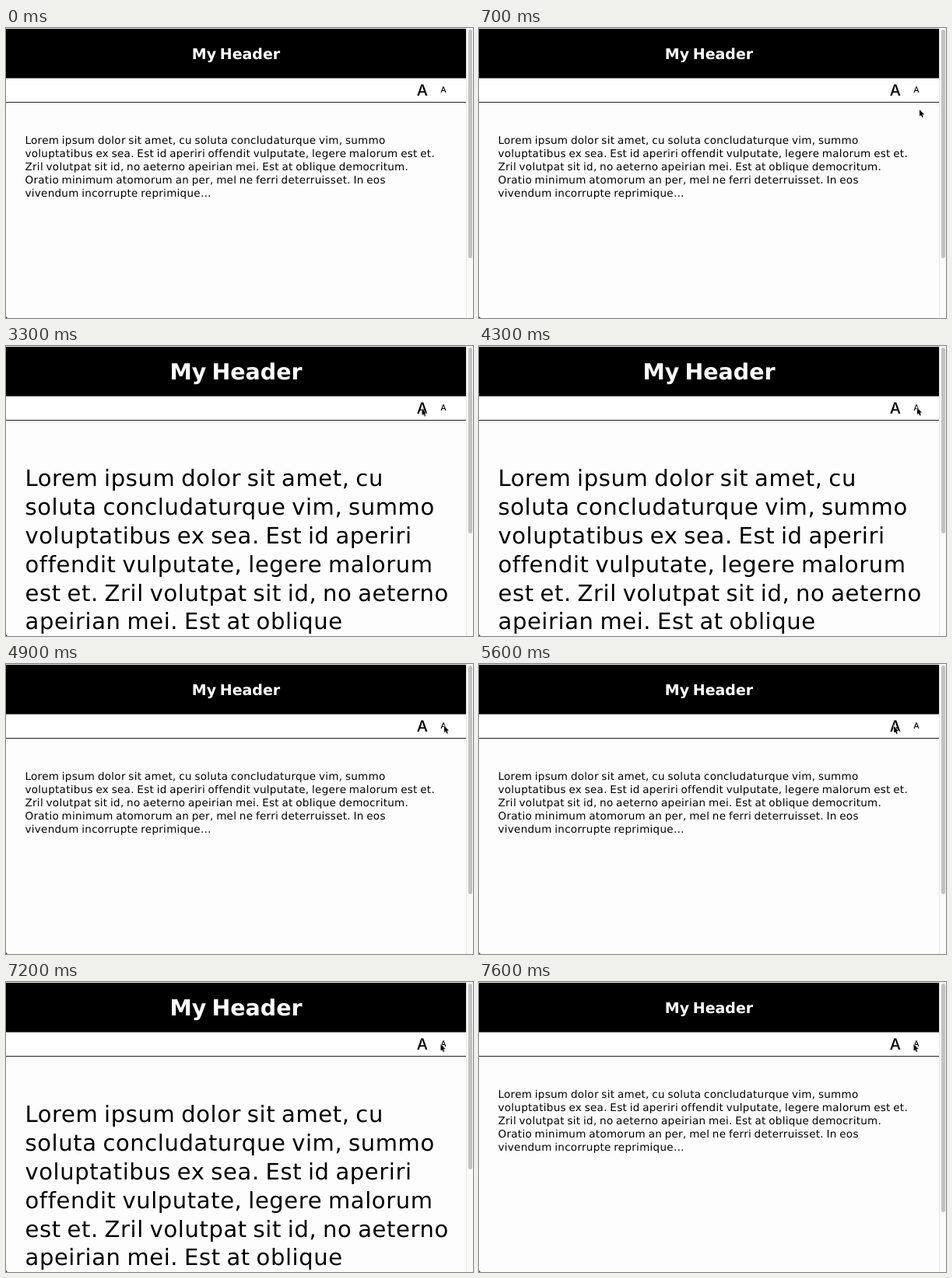
These frames come from a looping animation (600x373 px, 8 s). An HTML page:

```html
<!DOCTYPE html>
<html lang="en">
<head>
<meta charset="utf-8">
<title>Text size controls</title>
<style>
  html, body { margin: 0; width: 100%; height: 100%; overflow: hidden; background: #fdfdfe; }
  svg { display: block; width: 600px; height: 373px; }
  text { font-family: "DejaVu Sans", sans-serif; text-rendering: geometricPrecision; }
  .title { font-weight: 700; fill: #fff; text-anchor: middle; word-spacing: -.1em; }
  .copy { letter-spacing: .021em; word-spacing: -.07em; }
  .small .title { font-size: 19px; }
  .large .title { font-size: 28.5px; }
  .small .copy { font-size: 13.5px; }
  .large .copy { font-size: 29px; }
  .button { font-family: Inter, sans-serif; font-weight: 500; text-anchor: middle; }
  .thumb { fill: #c1c1c1; }

  .small, .large, .cursor { animation: 8s step-end infinite; }
  .small { animation-name: show-small; }
  .large { animation-name: show-large; }
  .cursor { animation-name: point; }

  @keyframes show-small {
    0%, 61.25%, 95%, 100% { visibility: visible; }
    41.25%, 77.5% { visibility: hidden; }
  }
  @keyframes show-large {
    0%, 61.25%, 95%, 100% { visibility: hidden; }
    41.25%, 77.5% { visibility: visible; }
  }
  @keyframes point {
    0% { visibility: hidden; transform: translate(566px, 105px); }
    8.75% { visibility: visible; transform: translate(566px, 105px); }
    10% { transform: translate(558px, 99px); }
    11.25% { transform: translate(549px, 92px); }
    12.5% { transform: translate(541px, 86px); }
    13.75% { transform: translate(536px, 82px); }
    15% { transform: translate(534.5px, 80.5px); }
    51.25% { transform: translate(541px, 82px); }
    52.5% { transform: translate(557px, 81px); }
    53.75% { transform: translate(563px, 79.5px); }
    67.5% { transform: translate(554px, 80px); }
    68.75% { transform: translate(538px, 80px); }
    70% { transform: translate(533px, 80px); }
    85% { transform: translate(545px, 79px); }
    86.25% { transform: translate(555.5px, 79px); }
    88.75% { transform: translate(557px, 80px); }
    90%, 100% { visibility: visible; transform: translate(558.5px, 80px); }
  }
</style>
</head>
<body>
<svg viewBox="0 0 600 373">
  <rect width="600" height="373" fill="#fdfdfe"/>
  <rect width="591" height="1" fill="#e8e8e8"/>
  <rect y="64" width="591" height="31" fill="#fff"/>
  <rect y="1" width="591" height="63.6" fill="#000"/>
  <rect y="95" width="591" height="1" fill="#222"/>
  <rect x="591" width="9" height="373" fill="#fafafa"/>
  <rect x="591" width="1" height="373" fill="#e6e6e6"/>
  <path d="M0 370.5Q.5 372.5 2.5 373H0Z" fill="#333"/>

  <g class="small">
    <text class="title" x="295.5" y="39.8">My Header</text>
    <text class="copy">
      <tspan x="24.5" y="148.8">Lorem ipsum dolor sit amet, cu soluta concludaturque vim, summo</tspan>
      <tspan x="24.5" y="165.8">voluptatibus ex sea. Est id aperiri offendit vulputate, legere malorum est et.</tspan>
      <tspan x="24.5" y="182.8">Zril volutpat sit id, no aeterno apeirian mei. Est at oblique democritum.</tspan>
      <tspan x="24.5" y="199.8">Oratio minimum atomorum an per, mel ne ferri deterruisset. In eos</tspan>
      <tspan x="24.5" y="216.8">vivendum incorrupte reprimique…</tspan>
    </text>
    <rect class="thumb" x="594" y="2" width="5" height="294" rx="2.5"/>
  </g>

  <g class="large">
    <text class="title" x="295.5" y="43.3">My Header</text>
    <text class="copy">
      <tspan x="24.5" y="180.3">Lorem ipsum dolor sit amet, cu</tspan>
      <tspan x="24.5" y="217.1">soluta concludaturque vim, summo</tspan>
      <tspan x="24.5" y="253.9">voluptatibus ex sea. Est id aperiri</tspan>
      <tspan x="24.5" y="290.7">offendit vulputate, legere malorum</tspan>
      <tspan x="24.5" y="327.5">est et. Zril volutpat sit id, no aeterno</tspan>
      <tspan x="24.5" y="364.3">apeirian mei. Est at oblique</tspan>
    </text>
    <rect class="thumb" x="594" y="2" width="5" height="239" rx="2.5"/>
  </g>

  <text class="button" x="534.8" y="86.5" font-size="20">A</text>
  <text class="button" x="562" y="83" font-size="10.5">A</text>

  <path class="cursor" d="M0 0V8.6L2 6.9L3.3 10L4.8 9.4L3.5 6.3H6.2Z" stroke="#fff" stroke-width="1.2" paint-order="stroke"/>
</svg>
</body>
</html>
```
